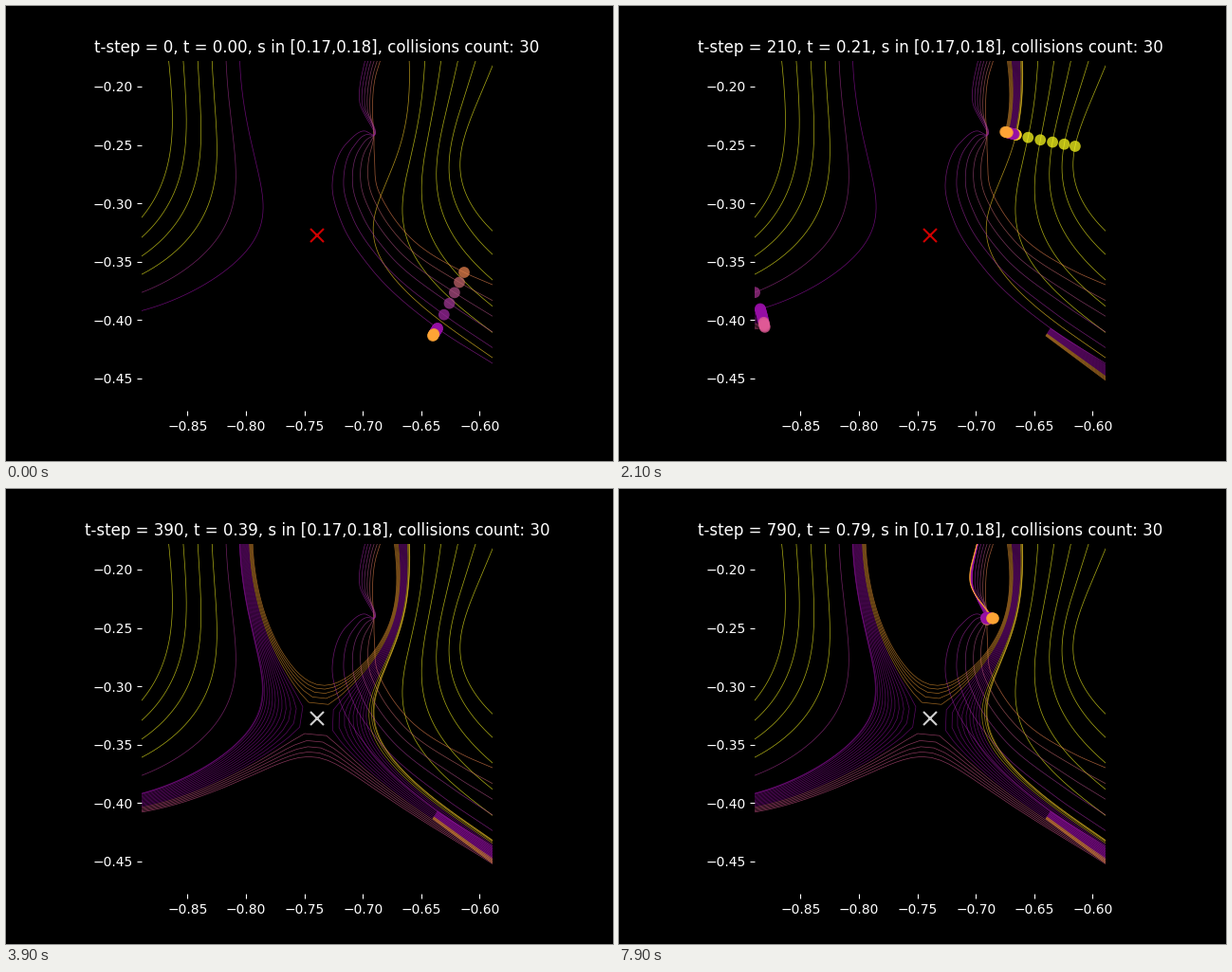
Recreate the animation shown at these times as a matplotlib script. Size 640 by 480 pixels, loop 8000 ms.

```python
import numpy as np
import matplotlib.pyplot as plt
from matplotlib.animation import FuncAnimation

FRAMES, SUB = 80, 10
CX, CY, HALF = -0.7392, -0.32777, 0.15
SCALE = 1232            # pixels per data unit
SADDLE = 328 + 242.4j   # the cross, in pixels
STEPS = np.arange(FRAMES * SUB) / SUB

YELLOW, GOLD, ORANGE = "#f8f81e", "#ffd228", "#ffa535"
PURPLE, MAUVE, PINK = "#960fa5", "#a0308c", "#e05a96"


def to_data(z):
    return np.column_stack([CX - HALF + (z.real - 143.2) / SCALE,
                            CY + HALF - (z.imag - 57.6) / SCALE])


# Two roots meet at the saddle: z is a power series in +-sqrt(tau + i sigma),
# with tau running along a path and sigma telling the paths apart.
PLUS = {
    4.3 - .3j: 279 + 133j, 4.3 + 1.7j: 242 + 143j, 4.3 + 5.7j: 165 + 142j,
    9.3 + .7j: 249 + 59j, 9.1 + 5.7j: 168 + 59j, 1.3 + 5.7j: 144 + 190j,
    -5.5 + 5.7j: 72 + 262j, -5.5 + 1.7j: 142 + 288j, -5.5 + .7j: 150 + 305j,
    -12 + .7j: 45 + 322j, .7j: 272 + 226j, -.3j: 335 + 206j,
    -5.5 - .3j: 402 + 133j, -11.2 - .3j: 416 + 59j,
}
MINUS = {
    -5.5 + .7j: 411 + 137j, -5.5 + 2.7j: 434 + 145j, -5.5 + 5.7j: 473 + 150j,
    -11.2 + .7j: 428 + 59j, -11.7 + 5.7j: 513 + 59j, .7j: 383 + 242j,
    4.3 + .7j: 465 + 348j, 4.3 + 3.7j: 506 + 293j, 3 + 5.7j: 513 + 233j,
    8 + 5.7j: 600 + 315j, 11 + .7j: 590 + 425j, 4.3 - .3j: 453 + 369j,
    -.3j: 317 + 284j, -5.5 - .3j: 158 + 323j,
}
POWERS = np.arange(1, 8)


def powers(w, sign):
    q = sign * np.sqrt(np.conj(np.asarray(w, complex)))
    return q[:, None] ** POWERS


basis = np.vstack([powers(list(PLUS), 1), powers(list(MINUS), -1)])
places = np.array([*PLUS.values(), *MINUS.values()])
COEF = np.linalg.lstsq(basis, places - SADDLE, rcond=None)[0]


def root(tau, sigma, sign):
    z = SADDLE + powers(tau + 1j * sigma, sign) @ COEF
    z[(tau < -13) | (tau > 10.5)] = np.nan
    return to_data(z)


def tau_at(frame):
    """Fast while passing the saddle, slow far from it."""
    d = frame - 26.25
    return 2.05 * np.arcsinh(d / 2) + 0.385 * d


def tint(sigma, sign):
    if sigma > 2 or (sign < 0 and sigma > 1):
        return YELLOW
    if sigma > 1:
        return MAUVE
    if sigma < 0:
        return ORANGE if sign > 0 else PINK
    return GOLD if sign < 0 and sigma > 0.55 else PURPLE


def hermite(x, xs, ys):
    """Cubic through (xs, ys), straight beyond both ends."""
    m = np.gradient(ys, xs)
    xc = np.clip(x, xs[0], xs[-1])
    i = np.clip(np.searchsorted(xs, xc) - 1, 0, len(xs) - 2)
    h = xs[i + 1] - xs[i]
    u = (xc - xs[i]) / h
    inside = ((1 + 2 * u) * (1 - u) ** 2 * ys[i] + u * (1 - u) ** 2 * h * m[i]
              + u * u * (3 - 2 * u) * ys[i + 1] + u * u * (u - 1) * h * m[i + 1])
    return inside + (x - xc) * m[i + (x > xs[-1])]


def chords(pts):
    return np.r_[0, np.cumsum(abs(np.diff(pts)))]


def curve(pts):
    s = chords(pts)
    return to_data(hermite(np.linspace(-30, s[-1] + 30, 400), s, pts))


def track(pts, keys):
    """Place at every time step; keys maps point index to time in frames."""
    s = chords(pts)
    times = np.array(list(keys.values()), float)
    return to_data(hermite(hermite(STEPS, times, s[list(keys)]), s, pts))


static, movers, trails = [], [], []


def add(path, color, trail=False):
    movers.append((path, color))
    if trail:
        trails.append((path, color))


# Coarse paths, known from the start
tau_line = np.linspace(-13, 10.5, 400)
for sign in (1, -1):
    for sigma in np.arange(5.7, 0, -1):
        color = tint(sigma, sign)
        static.append((root(tau_line, sigma, sign), color))
        add(root(tau_at(STEPS), sigma, sign), color)

# Loops on the right, reached from the top through a narrow neck
NECK = dict(enumerate([57, 64, 72, 79]))
neck_f = np.array([388 + 30j, 377.5 + 62j, 373 + 102j, 387 + 136j])
neck_a = np.array([396 + 53j, 389 + 77j, 386.5 + 113j, 388 + 138j])
neck_z = np.array([386 + 30j, 376.5 + 61j, 370 + 98j, 395 + 136.5j])
loop_f = np.array([379 + 132j, 359 + 145j, 344 + 188j, 354 + 229j, 385 + 277j,
                   455 + 340j, 513 + 377j])
loop_a = np.array([388 + 150j, 388.5 + 160j, 391 + 190j, 402 + 213j, 425 + 243j,
                   483 + 281j, 513 + 294j])
bend = 0.85 + 0.15 * np.linspace(-1, 1, 7) ** 4
for w in np.linspace(1, 0, 6):
    neck = neck_f + w * (neck_a - neck_f)
    path = np.r_[neck, loop_f + w ** bend * (loop_a - loop_f)]
    color = (0.6 + 0.3 * w ** 3, 0.12 + 0.38 * w ** 1.5, 0.62 - 0.32 * w ** 2)
    static.append((curve(path), color))
    add(track(path, {9: 0, 10: 8 - 4.2 * w}), color)
    add(track(path, NECK), color)

# Fine paths, drawn as they go
for u in np.linspace(0, 1, 17):
    sigma = 0.72 - u
    color = ORANGE if u > 0.7 else PURPLE
    add(to_data(455 + 340j + u * (-5 + 8j) + STEPS * (7.25 + 4.8j + 0.6j * u)),
        color, True)
    add(track(neck_f + u * (neck_z - neck_f), NECK), color, True)
    for sign in (-1, 1):
        add(root(tau_at(STEPS), sigma, sign), tint(sigma, sign), True)

plt.style.use("dark_background")
fig, ax = plt.subplots(figsize=(6.4, 4.8), dpi=100)
ax.set_aspect("equal")
ax.set_xlim(CX - HALF, CX + HALF)
ax.set_ylim(CY - HALF, CY + HALF)
ax.set_xticks(np.arange(-0.85, -0.59, 0.05))
ax.set_yticks(np.arange(-0.45, -0.19, 0.05))
ax.set_autoscale_on(False)
ax.spines[:].set_visible(False)
title = ax.set_title("")

for xy, color in static:
    ax.plot(*xy.T, color=color, lw=0.5, alpha=0.7, zorder=2)
lines = [ax.plot([], [], color=color, lw=0.5, alpha=0.6, zorder=2)[0]
         for _, color in trails]
dots = ax.scatter(*np.zeros((2, len(movers))), s=72, linewidths=0,
                  c=[color for _, color in movers], alpha=0.75, zorder=3)
cross, = ax.plot([CX], [CY], "x", ms=10, mew=1.5, alpha=0.82, zorder=4)


def update(frame):
    k = frame * SUB
    title.set_text(f"t-step = {k}, t = {k / 1000:.2f}, "
                   "s in [0.17,0.18], collisions count: 30")
    for line, (path, _) in zip(lines, trails):
        line.set_data(*path[:k + 1].T)
    dots.set_offsets([path[k] for path, _ in movers])
    cross.set_color("red" if tau_at(frame) < 0 else "white")
    return [title, dots, cross, *lines]


anim = FuncAnimation(fig, update, frames=FRAMES, interval=100, repeat=True)
plt.show()
```
